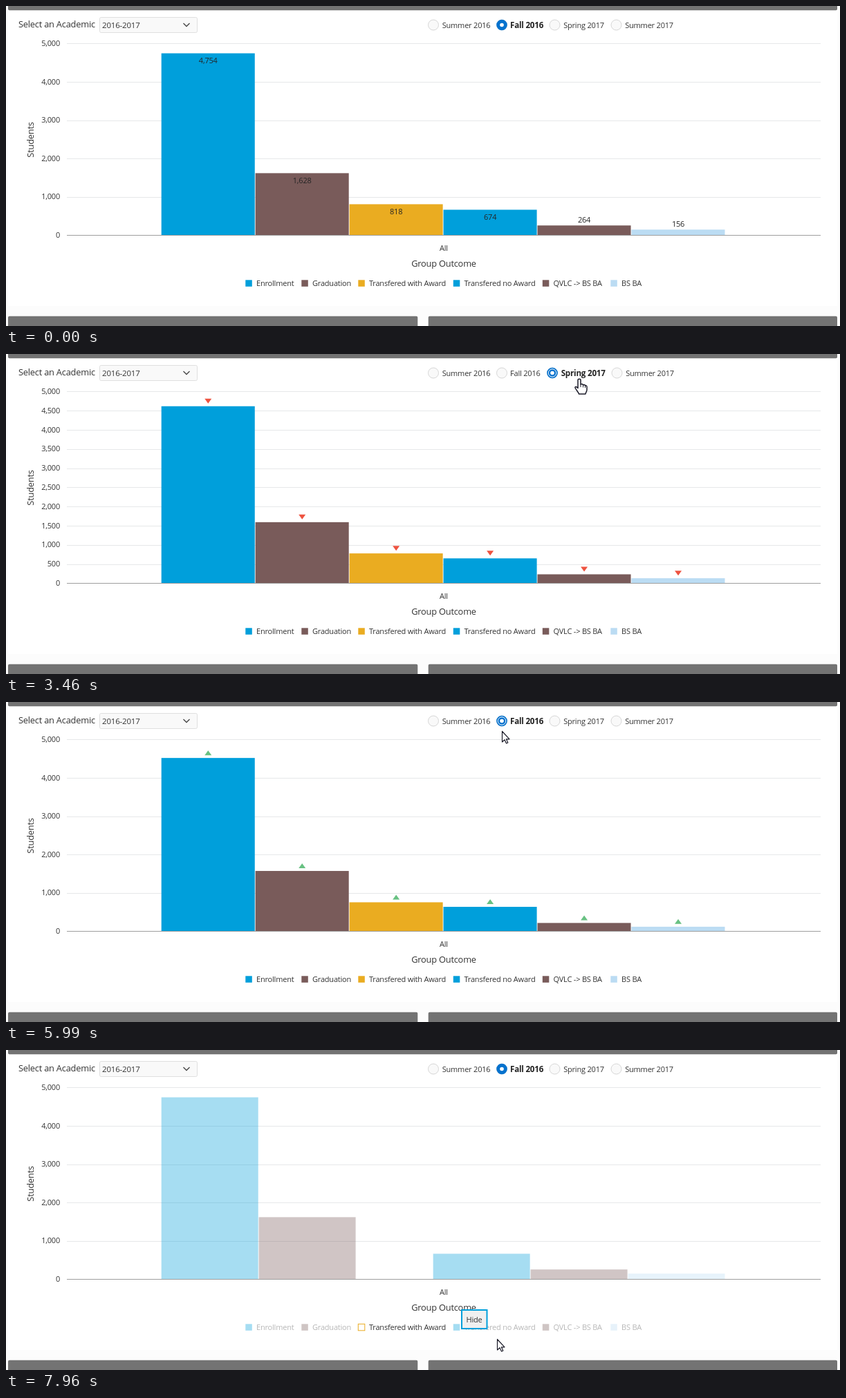
An HTML page that plays this animation: 1206x464 px, repeating every 8000 ms.

```html
<!DOCTYPE html>
<html lang="en">
<head>
<meta charset="utf-8">
<title>Student outcomes</title>
<style>
  html, body { margin: 0; width: 100%; height: 100%; overflow: hidden; background: #fcfcfc; }
  svg { display: block; width: 1206px; height: 464px; }
  text { font: 11px "Open Sans", "Noto Sans", sans-serif; letter-spacing: -.2px; fill: #333; }
  .title { font-size: 12.8px; }
  .bold { font-size: 11.6px; font-weight: 700; fill: #222; }
  .value { fill: #252525; }
  .mid { text-anchor: middle; }
  .end { text-anchor: end; }
</style>
</head>
<body>
<svg id="stage" viewBox="0 0 1206 464">
  <rect x="3" width="1199" height="435" fill="#fff"/>
  <g fill="#737373">
    <rect x="3" y="-4" width="1199" height="10.2" rx="2"/>
    <rect x="3" y="449.700" width="592.300" height="20" rx="2"/>
    <rect x="610.700" y="449.700" width="591.300" height="20" rx="2"/>
  </g>
  <text class="title" x="18" y="30.5">Select an Academic</text>
  <rect x="135.5" y="16.5" width="141" height="22" rx="2" fill="#f9f9f9" stroke="#dfdfdf"/>
  <text x="139" y="32" style="font-size:11.5px">2016-2017</text>
  <path d="M256.500 25l4.500 4.500 4.500-4.500" fill="none" stroke="#444" stroke-width="1.300"/>
  <text class="title mid" transform="translate(40 194) rotate(-90)">Students</text>
  <text class="mid" x="633" y="355">All</text>
  <text class="title mid" x="633" y="378">Group Outcome</text>
</svg>
<script>
const LOOP = 8000, BLUE = '#0572ce';
const COLORS = ['#009fdb', '#795b5a', '#eaac21', '#009fdb', '#795b5a', '#bbdcf3'];
const FALL = [4754, 1628, 818, 674, 264, 156];
const SPRING = [4516, 1579, 761, 644, 223, 125];
const LEGEND = [['Enrollment', 346], ['Graduation', 427], ['Transfered with Award', 509],
  ['Transfered no Award', 646.5], ['QVLC -> BS BA', 775.5], ['BS BA', 874]];
const HIDDEN = 2, LEFT = 224.3, SLOT = 135.95;

// time, x, y of the pointer tip
const PATH = [[680, 825, 222], [920, 599, 62], [1140, 599, 62], [1500, 868, 42], [1830, 833, 21],
  [2320, 833, 21], [2780, 829, 36], [3920, 829, 36], [4180, 770, 20], [4430, 715, 19],
  [4670, 715, 19], [4680, 715, 20], [4840, 715, 20], [4930, 718, 21], [5150, 718, 21],
  [5310, 718, 22], [5900, 718, 24], [5990, 717, 42], [6560, 701, 393], [6690, 675, 413],
  [6750, 675, 421], [6840, 675, 421], [7100, 578, 401], [7500, 578, 401], [7860, 652, 410],
  [7960, 710, 419]];

const stage = document.getElementById('stage');
function make(tag, attrs = {}, parent = stage) {
  const el = document.createElementNS('http://www.w3.org/2000/svg', tag);
  parent.append(el);
  return set(el, attrs);
}
function set(el, attrs) {
  for (const k in attrs) {
    if (k === 'text') el.textContent = attrs[k];
    else el.setAttribute(k, attrs[k]);
  }
  return el;
}
const ramp = (t, from, to) => Math.min(1, Math.max(0, (t - from) / (to - from)));
const mix = (a, b, p) => a + (b - a) * p;
const ease = p => p < .5 ? 2 * p * p : 1 - 2 * (1 - p) ** 2;
const within = (t, ...spans) => spans.some(([a, b]) => t >= a && t < b);
const yOf = v => 332.9 - v * .0556;
const show = (el, on) => set(el, { opacity: +on });

// Axis
const halfTicks = make('g');
for (let v = 0; v <= 5000; v += 500) {
  const parent = v % 1000 ? halfTicks : stage, y = Math.floor(yOf(v)) + .5;
  if (v) make('path', { d: `M88 ${y}H1178`, stroke: '#e6e8e9' }, parent);
  make('text', { class: 'end', x: 78, y: yOf(v) + 3, text: v.toLocaleString('en-US') }, parent);
}

// Bars
const bars = COLORS.map(fill => make('rect', { fill }));
make('path', { d: 'M88 332.5H1178', stroke: '#9e9e9e' });
const labels = COLORS.map(() => make('text', { class: 'value mid' }));
const arrows = COLORS.map(() => make('path'));

// Legend
const entries = LEGEND.map(([text, x], i) => {
  const g = make('g');
  const mark = make('rect', { x: x + .3, y: 397.3, width: 9.5, height: 9.5, fill: COLORS[i] }, g);
  make('text', { x: x + 16, y: 406, text }, g);
  return { g, mark };
});

// Radio buttons
const radios = ['Summer 2016', 'Fall 2016', 'Spring 2017', 'Summer 2017'].map(text => {
  const g = make('g');
  make('circle', { r: 7.5, fill: '#f9f9f9', stroke: '#d6d6d6' }, g);
  const disc = make('circle', { r: 7.8, fill: BLUE }, g);
  const ring = make('circle', { r: 5.7, fill: 'none', stroke: '#fff', 'stroke-width': 1 }, g);
  const dot = make('circle', { r: 2.8, fill: '#fff' }, g);
  return { g, disc, ring, dot, label: make('text', { y: 32, text }) };
});

// Spinner, tooltip, pointer
const spinner = make('g');
make('circle', { cx: 603, cy: 222, r: 30.5, fill: '#fff', stroke: '#e4e4e4' }, spinner);
make('circle', { cx: 603, cy: 222, r: 15, fill: 'none', stroke: '#e2e2e2', 'stroke-width': 4 }, spinner);
const arc = make('path', { d: 'M603 207a15 15 0 0 1 15 15', fill: 'none', stroke: '#707070', 'stroke-width': 4 }, spinner);

const tip = make('g');
const tipBox = make('rect', { x: 1, y: 1, width: 36.5, height: 27, fill: '#f0f0f0', 'stroke-width': 2 }, tip);
make('text', { class: 'mid', x: 19, y: 18.5, text: 'Hide' }, tip);

const pointer = make('g');
const halo = make('circle', { r: 12, fill: '#ffee00' }, pointer);
const shape = { fill: '#fff', stroke: '#1b1b28', 'stroke-width': 1.2, 'stroke-linejoin': 'round' };
const arrow = make('path', { ...shape, d: 'M.5.5V16L4 12.700 6.500 18 8.800 17 6.400 11.800H11Z' }, pointer);
const hand = make('g', {}, pointer);
make('path', { ...shape, 'stroke-width': 1.5, d: 'M-2 2C-2-.3 2-.3 2 2V8C4 7 5.500 8 5.500 9C7.500 8 8.500 9 8.500 10' +
  'C10.500 9.500 11 10.500 11 12V16C11 18 9.500 19 9 22H-.5C-1 19.500-4 17-6 13C-6.500 11.500-4.500 10.500-2 13.500Z' }, hand);
make('path', { d: 'M2 8V12M5.500 9V12.500M8.500 10V13', stroke: '#1b1b28' }, hand);

function drawChart(t) {
  const share = ease(ramp(t, 3060, 3830)) - ease(ramp(t, 5880, 6580));
  const moving = within(t, [3100, 3830], [5880, 6580]);
  const shown = t < 3100 ? 1 : t < 5880 ? ramp(t, 3910, 4020) : t < 7300 ? ramp(t, 6580, 6660) : 0;
  const names = t >= 3100 && t < 5880 ? SPRING : FALL;
  const dim = mix(1, .35, ramp(t, 6840, 6950));
  const widen = ease(ramp(t, 7810, 8310));
  show(halfTicks, t >= 3100 && t < 5880);

  let x = LEFT;
  bars.forEach((bar, i) => {
    const w = i === HIDDEN ? SLOT * (1 - widen) : SLOT * (1 + widen / 5);
    const top = yOf(mix(FALL[i], SPRING[i], t < 3100 ? 0 : share)), cx = x + w / 2;
    set(bar, { x: x + .4, y: top, width: Math.max(0, w - .9), height: 332 - top,
      opacity: i === HIDDEN ? 1 - ramp(t, 7480, 7800) : dim });
    set(labels[i], { x: cx, y: i < 4 ? top + 14.5 : top - 4, opacity: shown,
      text: names[i].toLocaleString('en-US') });
    const y = top - 4;
    set(arrows[i], { opacity: +moving, fill: t < 5000 ? '#ee5340' : '#68c182',
      d: t < 5000 ? `M${cx - 5} ${y - 7}h10l-5 7z` : `M${cx - 5} ${y}h10l-5-7z` });
    x += w;
  });

  entries.forEach(({ g, mark }, i) => {
    if (i !== HIDDEN) return show(g, dim);
    const off = t >= 7300;
    set(mark, { fill: off ? '#fff' : COLORS[i], stroke: off ? COLORS[i] : 'none' });
  });
}

function drawRadios(t) {
  const spring = t >= 2230 && t < 5190;
  const level = ramp(t, 2230, 2380) - ramp(t, 5190, 5325);
  const fills = [0, 1 - level, level, 0];
  const xs = [618, 717, spring ? 790 : 793.5, spring ? 883.5 : 882.5];
  radios.forEach((r, i) => {
    const on = i === (spring ? 2 : 1);
    set(r.g, { transform: `translate(${xs[i]} 27.5)` });
    show(r.disc, fills[i]);
    show(r.dot, on ? fills[i] ** 2 : 0);
    show(r.ring, on && t >= 2230 && t < 7300 ? fills[i] ** 2 : 0);
    set(r.label, { x: xs[i] + (i === 1 ? 12 : 12.7), class: on ? 'bold' : '' });
  });
}

function tipAt(t) {
  let i = PATH.findIndex(k => k[0] > t);
  if (i < 0) return PATH[PATH.length - 1].slice(1);
  if (i === 0) return PATH[0].slice(1);
  const [t0, x0, y0] = PATH[i - 1], [t1, x1, y1] = PATH[i];
  const p = ease((t - t0) / (t1 - t0));
  return [mix(x0, x1, p), mix(y0, y1, p)];
}

function drawPointer(t) {
  const [x, y] = tipAt(t);
  set(pointer, { transform: `translate(${x} ${y})`, opacity: +(t >= 680) });
  const isHand = within(t, [1640, 5960], [6530, 6610], [6960, 7860]);
  show(hand, isHand);
  show(arrow, !isHand);
  show(halo, within(t, [1980, 2220], [5150, 5290], [7090, 7300]) ? .65 : 0);

  show(tip, within(t, [6560, 6840], [6980, LOOP]));
  const [tx, ty] = t < 6840 ? [707, 359] : t < 7860 ? [x + 5, y - 35] : [658, 376];
  set(tip, { transform: `translate(${tx} ${ty})` });
  set(tipBox, { stroke: t < 6840 || x > 642 ? COLORS[0] : COLORS[2] });
}

function frame() {
  const t = performance.now() % LOOP;
  drawChart(t);
  drawRadios(t);
  show(spinner, within(t, [2400, 2770], [5450, 5830]));
  set(arc, { transform: `rotate(${t * .45} 603 222)` });
  drawPointer(t);
  requestAnimationFrame(frame);
}
frame();
</script>
</body>
</html>
```
